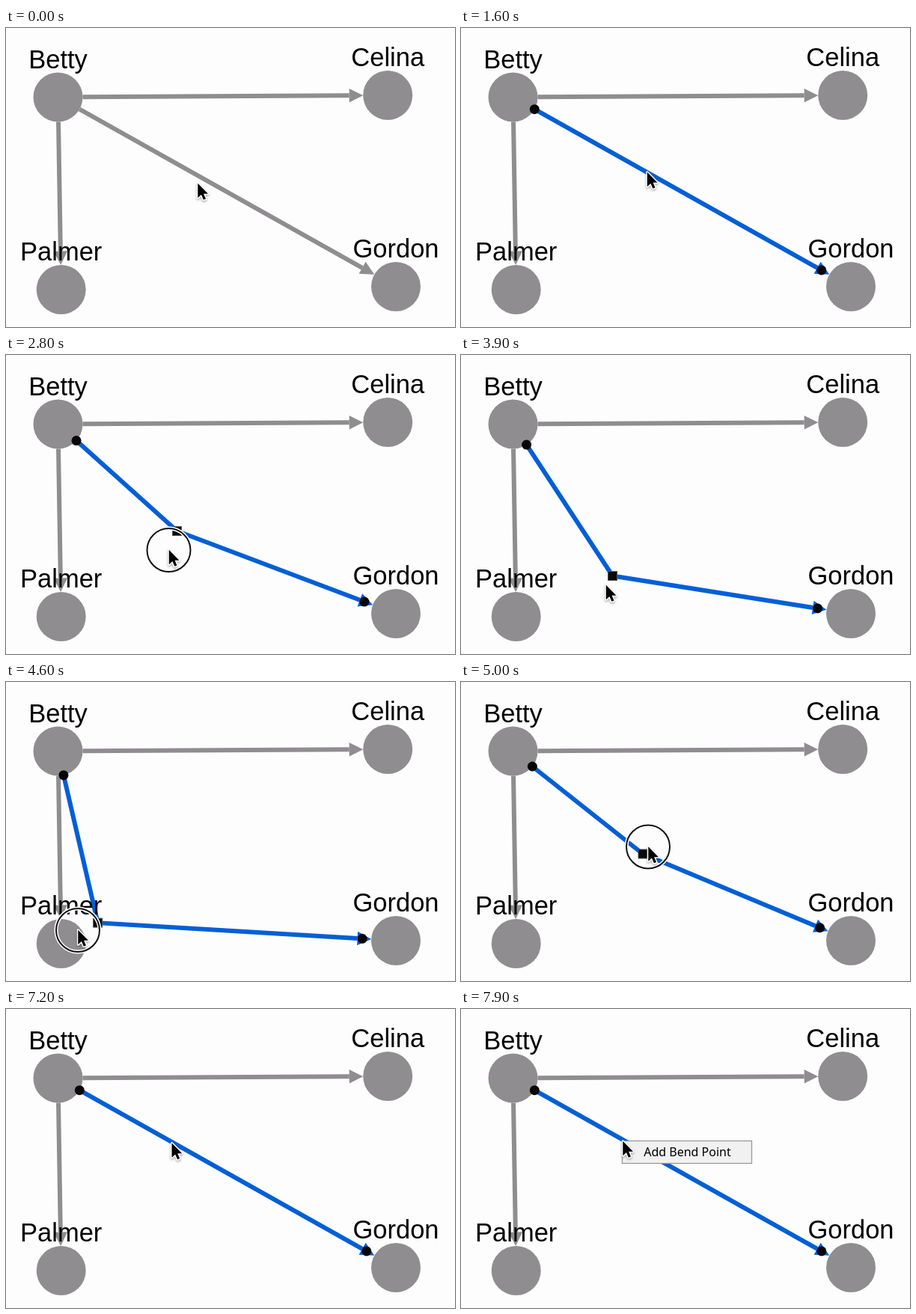
An HTML page with a canvas that plays this animation: 600x400 px, repeating every 8 s.

```html
<!DOCTYPE html>
<html lang="en">
<head>
<meta charset="utf-8">
<title>Bending an edge</title>
<style>
  html, body { margin: 0; width: 100%; height: 100%; overflow: hidden; background: #fefdfe; }
  canvas { display: block; }
</style>
</head>
<body>
<canvas id="stage" width="600" height="400"></canvas>
<script>
const ctx = document.getElementById('stage').getContext('2d');
const LOOP = 8000, STEP = 100;
const GREY = '#8f8d8f', BLUE = '#005fd6', RADIUS = 33;

const nodes = [
  { name: 'Betty', x: 69.5, y: 92.5 },
  { name: 'Celina', x: 510.2, y: 90 },
  { name: 'Palmer', x: 73.7, y: 350 },
  { name: 'Gordon', x: 521, y: 346 }
];
const [hub, right, below, far] = nodes;

// Pointer path: time, x, y
const path = [
  [0, 256, 207], [400, 256, 207], [700, 256, 211], [1000, 256, 211],
  [1100, 251, 198], [1300, 251, 198], [1600, 248.5, 192], [2200, 248.5, 192],
  [2700, 228.5, 235.5], [2800, 217.5, 260], [3300, 199, 317],
  [3500, 202.5, 295.5], [3600, 202.5, 295.5], [3800, 193.5, 307], [4000, 193.5, 307],
  [4200, 202.5, 295.5], [4600, 96, 331], [4900, 243, 230], [5000, 250, 219.5],
  [5300, 263, 199], [6400, 263, 199], [7300, 216, 176], [8000, 216, 176]
];
const presses = [[700, 1100], [2000, 3600], [4200, 5600], [7700, 7900]];
const glows = [[700, 900], [2000, 2300], [7700, 7900]];

const within = (t, spans) => spans.some(([from, to]) => t >= from && t < to);

function pointerAt(t) {
  const i = path.findIndex(p => p[0] > t);
  const [t0, x0, y0] = path[i - 1], [t1, x1, y1] = path[i];
  const k = (t - t0) / (t1 - t0);
  return { x: x0 + (x1 - x0) * k, y: y0 + (y1 - y0) * k };
}

// The bend trails the pointer by one step while dragged
function bendAt(t) {
  if (t < 2300 || t >= 5500) return null;
  if (t >= 3600 && t < 4300) return pointerAt(3500);
  return pointerAt(t - STEP);
}

function toward(from, to, distance) {
  const k = distance / Math.hypot(to.x - from.x, to.y - from.y);
  return { x: from.x + (to.x - from.x) * k, y: from.y + (to.y - from.y) * k };
}

function line(points, color, width) {
  ctx.beginPath();
  points.forEach(p => ctx.lineTo(p.x, p.y));
  ctx.strokeStyle = color;
  ctx.lineWidth = width;
  ctx.stroke();
}

function disc(p, r, color) {
  ctx.beginPath();
  ctx.arc(p.x, p.y, r, 0, 7);
  ctx.fillStyle = color;
  ctx.fill();
}

function edge(a, b, color, bend) {
  const tip = toward(b, bend || a, RADIUS);
  const base = toward(b, bend || a, RADIUS + 18.5);
  const start = toward(a, bend || b, RADIUS);
  line(bend ? [start, bend, base] : [start, base], color, 6);
  const dx = (tip.x - base.x) / 2, dy = (tip.y - base.y) / 2;
  ctx.beginPath();
  ctx.moveTo(tip.x, tip.y);
  ctx.lineTo(base.x - dy, base.y + dx);
  ctx.lineTo(base.x + dy, base.y - dx);
  ctx.fillStyle = color;
  ctx.fill();
}

function handles(bend) {
  disc(toward(hub, bend || far, RADIUS), 6.5, '#060606');
  disc(toward(far, bend || hub, RADIUS + 12), 6.5, '#060606');
  if (!bend) return;
  ctx.fillStyle = '#0a0a0a';
  ctx.strokeStyle = '#555';
  ctx.lineWidth = 1;
  ctx.fillRect(bend.x - 6, bend.y - 6, 12, 12);
  ctx.strokeRect(bend.x - 6, bend.y - 6, 12, 12);
}

function label(text, x, y, font) {
  ctx.font = font;
  ctx.textAlign = 'center';
  ctx.fillStyle = '#000';
  ctx.fillText(text, x, y);
}

function menu() {
  ctx.fillStyle = '#f2f1f2';
  ctx.strokeStyle = '#999';
  ctx.lineWidth = 1.3;
  ctx.fillRect(215.5, 176.5, 173, 30);
  ctx.strokeRect(215.5, 176.5, 173, 30);
  label('Add Bend Point', 302.5, 197, '16px "Noto Sans", sans-serif');
}

function ring({ x, y }) {
  for (const [color, width] of [['#fff', 5], ['#111', 2]]) {
    ctx.beginPath();
    ctx.arc(x, y + 1, 29, 0, 7);
    ctx.strokeStyle = color;
    ctx.lineWidth = width;
    ctx.stroke();
  }
}

const arrow = new Path2D('M0 0V19.5L4.6 15.2 7.6 22 10.7 20.7 7.8 13.9H13.7Z');
function pointer({ x, y }) {
  ctx.save();
  ctx.translate(x + 0.3, y + 0.8);
  ctx.shadowColor = 'rgba(0,0,0,.35)';
  ctx.shadowBlur = 3;
  ctx.shadowOffsetY = 1.5;
  ctx.strokeStyle = '#fff';
  ctx.lineWidth = 3;
  ctx.lineJoin = 'round';
  ctx.stroke(arrow);
  ctx.shadowColor = 'transparent';
  ctx.fillStyle = '#000';
  ctx.fill(arrow);
  ctx.restore();
}

function draw(t) {
  const selected = t >= 900, bend = bendAt(t), mouse = pointerAt(t);
  ctx.fillStyle = '#fefdfe';
  ctx.fillRect(0, 0, 600, 400);

  edge(hub, right, GREY);
  edge(hub, below, GREY);
  edge(hub, far, selected ? BLUE : GREY, bend);
  if (within(t, glows)) {
    line([toward(hub, far, 27), toward(far, hub, 31)], 'rgba(0,0,0,.25)', 42);
  }
  for (const n of nodes) {
    disc(n, RADIUS, GREY);
    label(n.name, n.x, n.y - 39, '34.5px "Liberation Sans", Arial, sans-serif');
  }
  if (selected) handles(bend);
  if (t >= 7900) menu();
  if (within(t, presses)) ring(mouse);
  pointer(mouse);
}

function tick() {
  draw(Math.floor(performance.now() % LOOP / STEP) * STEP);
  requestAnimationFrame(tick);
}
tick();
</script>
</body>
</html>
```
